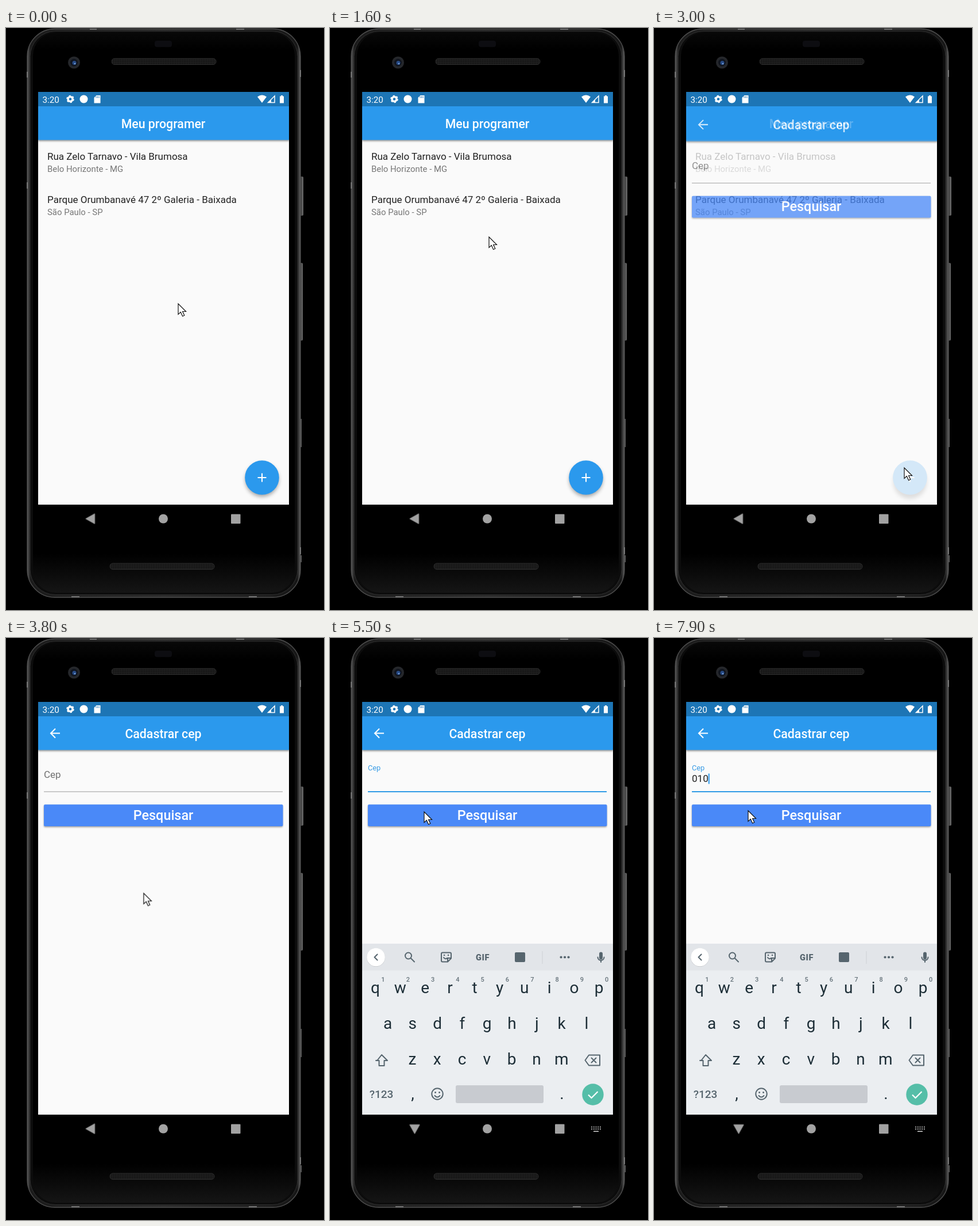
An HTML page that plays this animation: 554 by 1011 pixels, repeating every 8000 ms.

```html
<!DOCTYPE html>
<html lang="pt-BR">
<head>
<meta charset="utf-8">
<title>Cadastrar cep</title>
<style>
html, body { margin: 0; width: 100%; height: 100%; overflow: hidden; background: #000; }
svg { display: block; width: 100vw; height: 100vh; font-family: Roboto, sans-serif; }
.mid { text-anchor: middle; }
.bar-title { font-size: 21.3px; font-weight: 500; fill: #fff; }
.address { font-size: 17px; fill: #212121; }
.city { font-size: 14.9px; fill: #777; }
.line { fill: none; stroke-linecap: round; stroke-linejoin: round; }
.key { font-size: 28px; fill: #1d2e37; }
.hint { font-size: 11px; font-weight: 500; fill: #65727a; }
.tool { stroke: #56656e; stroke-width: 2; }

.anim, .anim * { animation-duration: 8s; animation-iteration-count: infinite; animation-fill-mode: both; }
#pointer { animation-name: pointer; }
#form { animation-name: page-slide; }
#form-fade { animation-name: page-fade; }
#fab-shadow { animation-name: lift; }
#fab-hover { animation-name: hover; }
#ripple { animation-name: ripple; }
#label { animation-name: label; }
#underline { animation-name: underline; }
#caret { animation-name: caret; }
#caret-blink { animation-name: blink; animation-timing-function: step-end; }
#back-key { animation-name: turn; }
#ime-key { animation-name: ime; animation-timing-function: step-end; }
#keyboard { animation-name: keyboard; }
.digit { animation-timing-function: step-end; }
.digit:nth-child(1) { animation-name: digit1; }
.digit:nth-child(2) { animation-name: digit2; }
.digit:nth-child(3) { animation-name: digit3; }

@keyframes pointer {
  0%, 4% { transform: translate(300px, 479px); animation-timing-function: ease-in-out; }
  20%, 24% { transform: translate(277px, 363px); animation-timing-function: ease-in-out; }
  33%, 38.75% { transform: translate(436px, 764px); animation-timing-function: ease-in; }
  45% { transform: translate(294px, 532px); animation-timing-function: ease-out; }
  58%, 62.5% { transform: translate(112px, 234px); animation-timing-function: ease-in-out; }
  67.5%, 90% { transform: translate(164px, 302px); }
  92%, 100% { transform: translate(164px, 300px); }
}
@keyframes page-slide {
  0%, 35.375% { transform: translateY(179px); animation-timing-function: cubic-bezier(.4, 0, .2, 1); }
  37.875%, 100% { transform: none; }
}
@keyframes page-fade {
  0%, 35.375% { opacity: 0; animation-timing-function: ease-in; }
  37.875%, 100% { opacity: 1; }
}
@keyframes lift {
  0%, 32% { transform: none; opacity: .36; }
  34.5%, 100% { transform: translateY(4px); opacity: .46; }
}
@keyframes hover { 0%, 32% { opacity: 0; } 33%, 100% { opacity: .1; } }
@keyframes ripple {
  0%, 34.25% { transform: translate(434px, 763px) scale(0); }
  35% { transform: translate(434px, 763px) scale(.17); }
  38%, 100% { transform: translate(446px, 781px) scale(1); }
}
@keyframes label {
  0%, 60.575% { transform: translate(66px, 242.5px); fill: #717171; animation-timing-function: cubic-bezier(.4, 0, .2, 1); }
  63.075%, 100% { transform: translate(66px, 230.3px) scale(.75); fill: #3a9ce6; }
}
@keyframes underline {
  0%, 57% { stroke: #999; stroke-width: 1.1px; }
  58%, 60.575% { stroke: #6b6b6b; stroke-width: 1.1px; animation-timing-function: cubic-bezier(.4, 0, .2, 1); }
  63.075%, 100% { stroke: #319be6; stroke-width: 2.1px; }
}
@keyframes caret {
  0%, 81.24% { transform: none; }
  81.25%, 87.49% { transform: translateX(9.6px); }
  87.5%, 93.74% { transform: translateX(19.1px); }
  93.75%, 100% { transform: translateX(28.7px); }
}
@keyframes blink {
  0% { opacity: 0; } 61.2% { opacity: 1; } 67.5% { opacity: 0; } 73.75% { opacity: 1; }
  80% { opacity: 0; } 81.25%, 100% { opacity: 1; }
}
@keyframes digit1 { 0% { visibility: hidden; } 81.25%, 100% { visibility: visible; } }
@keyframes digit2 { 0% { visibility: hidden; } 87.5%, 100% { visibility: visible; } }
@keyframes digit3 { 0% { visibility: hidden; } 93.75%, 100% { visibility: visible; } }
@keyframes turn {
  0%, 60.575% { transform: translate(147.5px, 852.5px); animation-timing-function: ease-out; }
  64.5%, 100% { transform: translate(147.5px, 852.5px) rotate(-90deg); }
}
@keyframes ime { 0% { opacity: 0; } 61.2%, 100% { opacity: 1; } }
@keyframes keyboard {
  0%, 61.5% { transform: translateY(297px); animation-timing-function: cubic-bezier(0, 0, .2, 1); }
  65%, 100% { transform: none; }
}
</style>
</head>
<body>
<svg viewBox="0 0 554 1011" preserveAspectRatio="none">
  <defs>
    <linearGradient id="rim" x2="1" y2="0">
      <stop offset="0" stop-color="#5a5a5a"/><stop offset=".012" stop-color="#1b1b1b"/>
      <stop offset=".5" stop-color="#2a2a2a"/><stop offset=".988" stop-color="#171717"/><stop offset="1" stop-color="#626262"/>
    </linearGradient>
    <linearGradient id="glass" x2="0" y2="1">
      <stop offset="0" stop-color="#080808"/><stop offset=".03" stop-color="#000"/>
      <stop offset=".93" stop-color="#000"/><stop offset="1" stop-color="#151515"/>
    </linearGradient>
    <linearGradient id="button" x2="1" y2="0">
      <stop offset="0" stop-color="#222"/><stop offset=".6" stop-color="#4d4d4d"/><stop offset="1" stop-color="#777"/>
    </linearGradient>
    <pattern id="mesh" width="3" height="3" patternUnits="userSpaceOnUse">
      <rect width="3" height="3" fill="#222"/><circle cx="1.5" cy="1.5" r=".9" fill="#080808"/>
    </pattern>
    <clipPath id="screen"><rect x="56" y="111" width="437" height="716.5"/></clipPath>
    <clipPath id="fab-edge"><circle cx="446" cy="781" r="29.8"/></clipPath>
    <filter id="soft" x="-30%" y="-30%" width="160%" height="160%"><feGaussianBlur stdDeviation="3.5"/></filter>
    <filter id="soft-bar" x="-5%" y="-20%" width="110%" height="140%"><feGaussianBlur stdDeviation="1.6"/></filter>
    <g id="app-bar">
      <rect x="56" y="112" width="437" height="84.5" opacity=".4" filter="url(#soft-bar)"/>
      <rect x="56" y="111" width="437" height="83.5" fill="#2b99ed"/>
    </g>
  </defs>

  <rect width="554" height="1011"/>

  <g id="phone">
    <g fill="url(#button)">
      <rect x="511" y="258" width="7" height="68" rx="2"/>
      <rect x="511" y="408" width="6" height="135" rx="2"/>
      <rect x="512" y="679" width="3" height="49"/>
      <rect x="512" y="916" width="3" height="12"/>
    </g>
    <rect x="37" y="1.5" width="476" height="987.5" rx="48" fill="url(#rim)" stroke="#515151" stroke-width="1.3"/>
    <rect x="42" y="5.5" width="466" height="979" rx="44" fill="#0c0c0c" stroke="#303030"/>
    <rect x="47" y="8" width="456" height="973" rx="40" fill="url(#glass)"/>
    <path d="M37 76v10M37 268v11M513 73v12M513 902v12M146 2h12M401 2h14M114 988h14M423 988h14" stroke="#777" stroke-width="2"/>
    <rect x="259" y="22" width="30" height="11" rx="4" fill="#0d0d11"/>
    <circle cx="118.500" cy="60" r="10.500" fill="#25272b"/>
    <circle cx="118.500" cy="60" r="6.500" fill="#10151f"/>
    <circle cx="119" cy="60.500" r="3.500" fill="#274b86"/>
    <circle cx="120" cy="62" r="1.200" fill="#83a9df"/>
    <rect x="184" y="53" width="182" height="10.500" rx="5" fill="url(#mesh)" stroke="#2c2c2c"/>
    <rect x="181" y="930" width="182" height="10.500" rx="5" fill="url(#mesh)" stroke="#2c2c2c"/>
  </g>

  <g class="anim" fill="#a2a2a2">
    <g id="back-key"><path d="M-8.500 0 7 -8.700V8.700Z" stroke="#a2a2a2" stroke-linejoin="round"/></g>
    <circle cx="274" cy="852.500" r="8"/>
    <rect x="392" y="844.500" width="16.500" height="16.500" rx="1"/>
    <g id="ime-key">
      <path d="M455 849.500h17M455 853h17" stroke="#a2a2a2" stroke-width="2" stroke-dasharray="2 1.750"/>
      <path d="M459 857h9" stroke="#a2a2a2" stroke-width="2"/>
    </g>
  </g>

  <g class="anim" clip-path="url(#screen)">
    <rect x="56" y="111" width="437" height="717" fill="#fafafa"/>
    <g id="list">
      <use href="#app-bar"/>
      <text class="bar-title mid" x="274" y="173.500">Meu programer</text>
      <text class="address" x="72" y="228.500">Rua Zelo Tarnavo - Vila Brumosa</text>
      <text class="city" x="72" y="249.500">Belo Horizonte - MG</text>
      <text class="address" x="72" y="304">Parque Orumbanavé 47 2º Galeria - Baixada</text>
      <text class="city" x="72" y="325">São Paulo - SP</text>
      <circle id="fab-shadow" cx="446" cy="785" r="29" filter="url(#soft)"/>
      <circle cx="446" cy="781" r="29.800" fill="#2b99ed"/>
      <circle id="fab-hover" cx="446" cy="781" r="29.800" fill="#fff"/>
      <g clip-path="url(#fab-edge)"><circle id="ripple" r="34" fill="#fff" fill-opacity=".15"/></g>
      <path d="M438.500 781h15M446 773.500v15" stroke="#fff" stroke-width="2.100"/>
    </g>

    <g id="form-fade"><g id="form">
      <rect x="56" y="111" width="437" height="717" fill="#fafafa"/>
      <use href="#app-bar"/>
      <path d="M94 165.500H78M86 157.500l-8 8 8 8" fill="none" stroke="#fff" stroke-width="2.100"/>
      <text class="bar-title mid" x="274" y="173.500">Cadastrar cep</text>
      <text id="label" font-size="17">Cep</text>
      <text x="66" y="250.300" font-size="17" fill="#222"><tspan class="digit">0</tspan><tspan class="digit">1</tspan><tspan class="digit">0</tspan></text>
      <g id="caret"><rect id="caret-blink" x="66" y="235.500" width="2" height="18" fill="#2b99ed"/></g>
      <path id="underline" d="M66 267H482"/>
      <rect x="66" y="291" width="416" height="37.500" rx="2" opacity=".4" filter="url(#soft-bar)"/>
      <rect x="66" y="289.300" width="416.500" height="37.700" rx="2" fill="#4a89f8"/>
      <text class="mid" x="274" y="315.800" font-size="23.400" font-weight="500" fill="#fff">Pesquisar</text>
    </g></g>

    <g id="status">
      <rect x="56" y="111" width="437" height="25" fill="#1d75b5"/>
      <g fill="#fff">
        <text x="63.500" y="129.500" font-size="15.200">3:20</text>
        <circle cx="112" cy="123.500" r="4" fill="none" stroke="#fff" stroke-width="3.400"/>
        <circle cx="112" cy="123.500" r="5.800" fill="none" stroke="#fff" stroke-width="2" stroke-dasharray="3 3.073"/>
        <circle cx="135.500" cy="123.500" r="7"/>
        <path d="M157.500 117h7v13.500h-11v-9.500Z"/>
        <path d="M438 119.500Q446 113.500 454 119.500L446 130Z"/>
        <path d="M456.500 129.500 468 118v11.500Z" fill="none" stroke="#fff" stroke-width="1.500"/>
        <path d="M462 124v6h-6Z"/>
        <path d="M477 118.500h2v-1.500h3v1.500h2V130.500h-7Z"/>
      </g>
      <path d="M157 118.500v3M159.500 118.500v3M162 118.500v3" stroke="#1d75b5"/>
    </g>

    <g id="keyboard">
      <rect x="56" y="531" width="437" height="297" fill="#ebeef1"/>
      <rect x="56" y="531" width="437" height="46.500" fill="#e2e5e9"/>
      <circle cx="80" cy="555" r="16" opacity=".15"/>
      <circle cx="80" cy="554.500" r="15.800" fill="#fff"/>
      <g class="line tool">
        <path d="M82.500 549.500l-5 5 5 5"/>
        <circle cx="136.500" cy="552" r="5.500"/><path d="M141 556.500l6 6"/>
        <path d="M196 546.500h13q2 0 2 2v8l-6 6h-9q-2 0-2-2v-12q0-2 2-2ZM211 556h-6v6M198 555q3 4 6 1"/>
        <path d="M199 551h.1M206 551h.1" stroke-width="2.500"/>
        <path d="M466.500 554.500c0 7 11 7 11 0M472 560v3"/>
        <path d="M82.500 733.500 90 724l10 10h-5.500v9h-9v-9H80Z"/>
        <path d="M451 724.500h19v18h-19l-6.500-9ZM455.500 729.500l8 8M463.500 729.500l-8 8"/>
        <circle cx="187" cy="792" r="9.700"/><path d="M182.500 795q4.500 5 9 0"/>
        <path d="M183.500 789.500h.1M190.500 789.500h.1" stroke-width="2.800"/>
      </g>
      <rect x="469" y="545.500" width="6" height="13" rx="3" fill="#56656e"/>
      <rect x="322" y="546" width="18" height="17" rx="2" fill="#56656e"/>
      <path d="M370 544v22" stroke="#cdd1d5"/>
      <path class="line" d="M402.500 554.500h.1M409 554.500h.1M415.500 554.500h.1" stroke="#56656e" stroke-width="4.200"/>
      <text class="mid" x="266" y="559.500" font-size="14.500" font-weight="900" letter-spacing=".6" fill="#56656e">GIF</text>
      <g id="keys" class="mid"></g>
      <text class="mid" x="89.500" y="799" font-size="19" font-weight="500" fill="#56656e">?123</text>
      <text class="key mid" x="144" y="801">,</text>
      <text class="key mid" x="404" y="801">.</text>
      <rect x="219" y="777" width="153" height="31" rx="3" fill="#c8cbd0"/>
      <circle cx="458" cy="793" r="18.700" fill="#55bea8"/>
      <path d="M450 793.500l5.500 5.500 11-11" fill="none" stroke="#fff" stroke-width="2.200"/>
    </g>
  </g>

  <g class="anim"><g id="pointer">
    <path d="M0 0V18.500L4.300 14.600 7.600 21.700 10.800 20.300 7.600 13.500H13.500Z" fill="#fff" stroke="#111" stroke-width="1.200"/>
  </g></g>
</svg>
<script>
const keys = document.getElementById('keys');
const pitch = 43.3;

function addText(className, x, y, text) {
  const node = document.createElementNS(keys.namespaceURI, 'text');
  node.setAttribute('class', className);
  node.setAttribute('x', x);
  node.setAttribute('y', y);
  node.textContent = text;
  keys.append(node);
}

[['qwertyuiop', 79, 617], ['asdfghjkl', 100.5, 679], ['zxcvbnm', 143.5, 741]].forEach(([row, left, y], r) => {
  [...row].forEach((letter, i) => {
    addText('key', left + i * pitch, y, letter);
    if (r === 0) addText('hint', left + 13.5 + i * pitch, 597, (i + 1) % 10);
  });
});

const step = 100, loop = 8000, slack = 20;
const animations = document.getAnimations();
animations.forEach(a => a.pause());
const start = performance.now();

function draw() {
  const elapsed = performance.now() - start + slack;
  const time = Math.floor(elapsed / step) * step % loop;
  animations.forEach(a => { a.currentTime = time; });
  requestAnimationFrame(draw);
}
draw();
</script>
</body>
</html>
```
